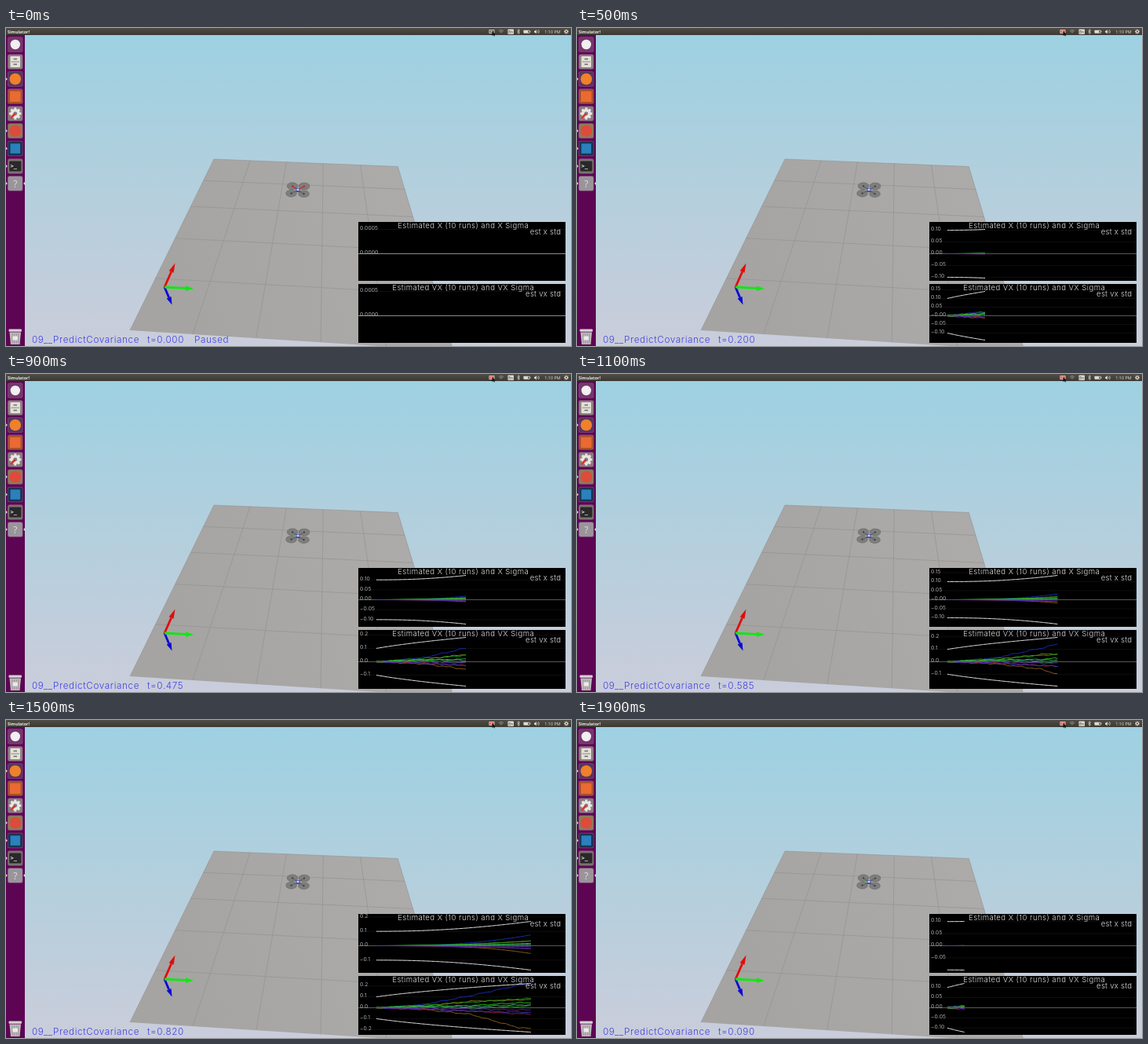
An HTML page with a canvas for the animation above (2 s loop, 720 px wide and 405 px high).

```html
<!DOCTYPE html>
<html lang="en">
<head>
<meta charset="utf-8">
<title>Simulator</title>
<style>
  html, body { margin: 0; width: 100%; height: 100%; overflow: hidden; }
  canvas { display: block; }
</style>
</head>
<body>
<canvas id="stage" width="720" height="405"></canvas>
<script>
const ctx = document.getElementById('stage').getContext('2d');
const STEP_MS = 100;
const SIM_TIMES = [0, .015, .06, .105, .15, .2, .27, .34, .405, .475,
                   .53, .585, .64, .69, .755, .82, .885, .95, .025, .09];

// Velocity of each run at t = 0.25, 0.5, 0.75 and 1.
const RUNS = [
  ['#1c30c8', .03, .11, .205, .23],
  ['#8c8c1c', .015, .06, .07, .1],
  ['#1ca01c', .025, .05, .08, .1],
  ['#28d828', .012, .02, .045, .05],
  ['#48b880', .015, .01, .025, .035],
  ['#98681c', -.015, -.06, -.18, -.22],
  ['#b01c38', -.01, -.03, -.055, -.06],
  ['#3040c8', -.012, -.03, -.04, -.05],
  ['#30a828', .005, -.005, .012, .02],
  ['#6a1cc0', 0, -.01, -.02, -.01]
];
const sigmaV = t => Math.sqrt(.01 + .0484 * t);
const sigmaX = t => Math.sqrt(.01 + .0145 * t * t + .0161 * t ** 3);

function velocity(run, index, t) {
  const k = Math.min(3, Math.floor(t * 4)), f = t * 4 - k;
  const from = k ? run[k] : 0;
  return from + (run[k + 1] - from) * f
    + .003 * Math.sin(t * 60 + index * 2) + .002 * Math.sin(t * 131 + index * 5);
}

const DT = .005;
const PATHS = RUNS.map((run, i) => {
  const v = [], x = [];
  let sum = 0;
  for (let n = 0; n <= 200; n++) {
    v.push(velocity(run, i, n * DT));
    x.push(sum);
    sum += v[n] * DT;
  }
  return { color: run[0], v, x };
});

function rect(x, y, w, h, fill, radius = 0) {
  ctx.fillStyle = fill;
  ctx.beginPath();
  ctx.roundRect(x, y, w, h, radius);
  ctx.fill();
}
function ellipse(x, y, rx, ry, fill) {
  ctx.fillStyle = fill;
  ctx.beginPath();
  ctx.ellipse(x, y, rx, ry, 0, 0, Math.PI * 2);
  ctx.fill();
}
const disc = (x, y, r, fill) => ellipse(x, y, r, r, fill);
function poly(points, fill) {
  ctx.fillStyle = fill;
  ctx.beginPath();
  points.forEach(p => ctx.lineTo(...p));
  ctx.fill();
}
function line(points, stroke, width = 1) {
  ctx.strokeStyle = stroke;
  ctx.lineWidth = width;
  ctx.beginPath();
  points.forEach(p => ctx.lineTo(...p));
  ctx.stroke();
}
function text(str, x, y, font, fill, align = 'left', spacing = 0) {
  ctx.font = font;
  ctx.fillStyle = fill;
  ctx.textAlign = align;
  ctx.letterSpacing = spacing + 'px';
  ctx.fillText(str, x, y);
  ctx.letterSpacing = '0px';
}
function gradient(x0, y0, x1, y1, ...colors) {
  const g = ctx.createLinearGradient(x0, y0, x1, y1);
  colors.forEach((c, i) => g.addColorStop(i / (colors.length - 1), c));
  return g;
}

// Maps the unit square onto the floor: u runs right, v runs towards the viewer.
const FLOOR = [[265, 167], [499.3, 176.5], [570, 411], [158, 385]];
function floorPoint(u, v) {
  const [a, b, c, d] = FLOOR;
  const sub = (p, q) => [p[0] - q[0], p[1] - q[1]];
  const cross = (p, q) => p[0] * q[1] - p[1] * q[0];
  const right = sub(b, c), near = sub(d, c);
  const skew = [a[0] - b[0] + c[0] - d[0], a[1] - b[1] + c[1] - d[1]];
  const g = cross(skew, near) / cross(right, near);
  const h = cross(right, skew) / cross(right, near);
  return [0, 1].map(i => (a[i] + u * (b[i] * (1 + g) - a[i]) + v * (d[i] * (1 + h) - a[i]))
    / (1 + g * u + h * v));
}

function drawFloor() {
  poly(FLOOR, gradient(200, 280, 510, 200, '#a5a4a2', '#acabaa'));
  line([FLOOR[3], FLOOR[0], FLOOR[1], FLOOR[2]], '#969695', .7);
  for (let k = 1; k < 5; k++) {
    line([floorPoint(k / 5, 0), floorPoint(k / 5, 1)], '#929291', .7);
    line([floorPoint(0, k / 5), floorPoint(1, k / 5)], '#929291', .7);
  }
}

function drawArrow(tip, headLength, color) {
  const from = [202, 330];
  const angle = Math.atan2(tip[1] - from[1], tip[0] - from[0]);
  const length = Math.hypot(tip[0] - from[0], tip[1] - from[1]);
  ctx.save();
  ctx.translate(...from);
  ctx.rotate(angle);
  rect(0, -1.4, length - headLength, 2.8, color);
  poly([[length - headLength, -3.2], [length, 0], [length - headLength, 3.2]], color);
  ctx.restore();
}

function drawDrone(step) {
  const rotors = [[365, 201.3], [380, 201.5], [363.5, 210.7], [379.5, 211.2]];
  rotors.forEach(([x, y], i) => {
    ellipse(x, y, 7.2, 4.8, '#747473');
    ellipse(x, y, 6.2, 3.9, '#7e7e7d');
    const front = i < 2 && !step;
    line([[x, y], [372, 206.5]], front ? '#d42020' : '#64646a', 1.1);
    disc(x, y, 1.1, front ? '#c02020' : '#38384c');
  });
  rect(369.5, 204, 5, 5, '#3c48a8');
  rect(370.5, 204.7, 3, 2.5, '#d4d4e0');
  if (step % 5 === 4) rect(366, 205, 4, 1.5, '#28c828');
}

function drawPlot(top, name, t, sigma, key) {
  const zero = top + 40.5;
  const limit = t ? sigma(t) : .0005;
  const scale = 31 / limit;
  const tick = t ? (limit > .15 ? .1 : .05) : .0005;
  const digits = t ? (tick === .1 ? 1 : 2) : 4;
  const yOf = value => zero - value * scale;
  const highest = top + 2.8, lowest = top + 71.1;

  ctx.save();
  ctx.beginPath();
  ctx.rect(449, top, 264, 75);
  ctx.clip();
  rect(449, top, 264, 75, '#000');

  const wide = tick === .05 && yOf(.15) >= highest;
  for (let k = 4; k >= -4; k--) {
    const y = yOf(k * tick);
    if (y < highest || y > lowest) continue;
    line([[449, y], [713, y]], k ? '#161616' : (t ? '#585858' : '#8c8c8c'), k ? .7 : 1);
    const sign = k < 0 || (k === 0 && wide) ? '−' : '';
    text(sign + Math.abs(k * tick).toFixed(digits), 451, y + .7,
      '300 6.8px Inter, sans-serif', '#d8d8d8', 'left', .15);
  }

  if (t) {
    const count = Math.round(t / DT);
    const xOf = n => 472 + 240 * n * DT;
    for (const path of PATHS) {
      line(path[key].slice(0, count + 1).map((v, n) => [xOf(n), yOf(v)]), path.color, .9);
    }
    for (const sign of [1, -1]) {
      const points = [];
      for (let n = 0; n <= count; n++) points.push([xOf(n), yOf(sign * sigma(n * DT))]);
      line(points, '#e4e4e4', 1);
    }
  }

  const font = '300 9.6px Inter, sans-serif';
  text(`Estimated ${name} (10 runs) and ${name} Sigma`, 582.7, top + 8.4, font, '#dcdcdc', 'center', .43);
  text(`est ${name.toLowerCase()} std`, 707.3, top + 15.6, font, '#dcdcdc', 'right', .25);
  ctx.restore();
}

function drawLauncher() {
  rect(0, 9, 24, 396, '#5d0553');
  const tile = (y, color) => {
    rect(2, y - 9.7, 19.5, 19.4, 'rgba(255,255,255,.25)', 2.5);
    rect(2.6, y - 9.1, 18.3, 18.2, color, 2);
  };

  tile(21, '#74386c');
  disc(11.8, 21, 6.2, '#f2eef1');

  tile(43, '#8b827e');
  rect(5.5, 36, 12.5, 14, '#e4e0da', 1);
  rect(6.5, 42.5, 10.5, 1, '#8b8680');
  rect(9.5, 38.7, 4.5, 1.6, '#77726c');
  rect(9.5, 45.5, 4.5, 1.6, '#77726c');

  tile(65, '#54375f');
  disc(11.8, 65, 7.3, '#f0802a');

  tile(87, '#a5512f');
  rect(5, 80.5, 13.5, 13.5, '#e96a33');

  tile(109, '#857d7e');
  for (let i = 0; i < 8; i++) {
    const a = i * Math.PI / 4;
    line([[11.8, 109], [11.8 + 7.6 * Math.cos(a), 109 + 7.6 * Math.sin(a)]], '#e8e6e4', 3);
  }
  disc(11.8, 109, 6, '#e8e6e4');
  disc(11.8, 109, 2.4, '#857d7e');
  line([[11.5, 109], [6, 115]], '#cf3a32', 2.8);

  tile(131, '#8d7b58');
  disc(11.8, 131, 7.3, '#dc4b3c');

  tile(153.5, '#18344f');
  rect(5.5, 147.2, 12.6, 12.6, '#2b80bd');

  tile(176, '#77746e');
  rect(4.2, 169.5, 15.2, 13, '#2a2829', 1);
  text('>_', 5.6, 177.5, 'bold 7px "DejaVu Sans Mono", monospace', '#f0f0f0');

  tile(198, '#99959a');
  text('?', 11.8, 202.5, '12px "Noto Sans", sans-serif', '#d9d7da', 'center');

  rect(3.5, 383.5, 16.5, 3.2, '#d5d3d3', 1);
  poly([[4.5, 387.5], [19, 387.5], [17.5, 403], [6, 403]], '#bfbcbd');
  for (let x = 8; x < 17; x += 2.6) line([[x, 389], [x, 402]], '#8d898b', .8);
  rect(8.5, 392.5, 6.5, 5, '#ebe9e9', 1);

  for (const y of [65, 131, 153.5, 176, 198]) {
    poly([[0, y - 2], [1.8, y], [0, y + 2]], '#e4dce2');
  }
  poly([[24, 196], [22.2, 198], [24, 200]], '#e4dce2');
}

function drawTopBar(recording) {
  const light = '#dfdbd2';
  rect(0, 0, 720, 9, gradient(0, 0, 0, 9, '#504d46', '#3b3934'));
  text('Simulator!', 2, 6.5, 'bold 5.4px "Noto Sans", sans-serif', '#f0eee8');

  rect(615.5, 2, 7, 5, light, .8);
  rect(616.3, 2.8, 5.4, 3.4, recording ? '#d8453c' : '#55524b', .4);
  rect(617.5, 3.7, 2.5, 1.6, light);
  poly([[619.5, 4], [619.5, 10], [621, 8.7], [622, 10.6], [623, 10.1], [622.1, 8.3], [623.7, 8]], '#111');

  ctx.strokeStyle = '#8f8c85';
  ctx.lineWidth = .9;
  for (const r of [1.5, 3, 4.5]) {
    ctx.beginPath();
    ctx.arc(631, 7, r, -Math.PI * .75, -Math.PI * .25);
    ctx.stroke();
  }
  rect(639.5, 1.5, 7.5, 6.5, light, .8);
  text('En', 643.2, 6.7, '5px "Noto Sans", sans-serif', '#3b3934', 'center');
  line([[651.5, 3.2], [654.7, 6], [653, 7.5], [653, 1.7], [654.7, 3.2], [651.5, 6]], light, .7);
  rect(659.5, 2.7, 8, 4, light, .6);
  rect(667.5, 3.8, .9, 1.8, light);
  rect(665.3, 3.5, 1.5, 2.4, '#4a4741');
  poly([[673, 3.7], [674.3, 3.7], [676, 2], [676, 7.4], [674.3, 5.7], [673, 5.7]], light);
  ctx.strokeStyle = light;
  ctx.lineWidth = .7;
  for (const r of [1.8, 3.4]) {
    ctx.beginPath();
    ctx.arc(676, 4.7, r, -.8, .8);
    ctx.stroke();
  }
  text('1:10 PM', 686.3, 6.6, '5.4px "Noto Sans", sans-serif', light);
  for (let i = 0; i < 4; i++) {
    const a = i * Math.PI / 4, dx = 3 * Math.cos(a), dy = 3 * Math.sin(a);
    line([[714 - dx, 4.6 - dy], [714 + dx, 4.6 + dy]], light, 1);
  }
  disc(714, 4.6, 2.1, light);
  disc(714, 4.6, 1, '#45423c');
}

function drawStatus(t) {
  const put = (str, x) => text(str, x, 400.7, '300 11.7px Inter, sans-serif', '#4040e4', 'left', .62);
  put('09__PredictCovariance', 33);
  put('t=' + t.toFixed(3), 180);
  if (!t) put('Paused', 240);
}

function draw(now) {
  const step = Math.floor(now / STEP_MS) % SIM_TIMES.length;
  const t = SIM_TIMES[step];
  rect(0, 0, 720, 405, gradient(0, 9, 0, 405, '#9dd1e2', '#b4cfdd', '#cacddb'));
  drawFloor();
  drawArrow([215.5, 299.5], 12, '#e00c0c');
  drawArrow([211.5, 352.5], 10, '#0808d4');
  drawArrow([239, 332], 10, '#10e810');
  drawDrone(step);
  drawPlot(247, 'X', t, sigmaX, 'x');
  drawPlot(326, 'VX', t, sigmaV, 'v');
  drawStatus(t);
  drawLauncher();
  drawTopBar(step > 0);
  requestAnimationFrame(draw);
}
requestAnimationFrame(draw);
</script>
</body>
</html>
```
